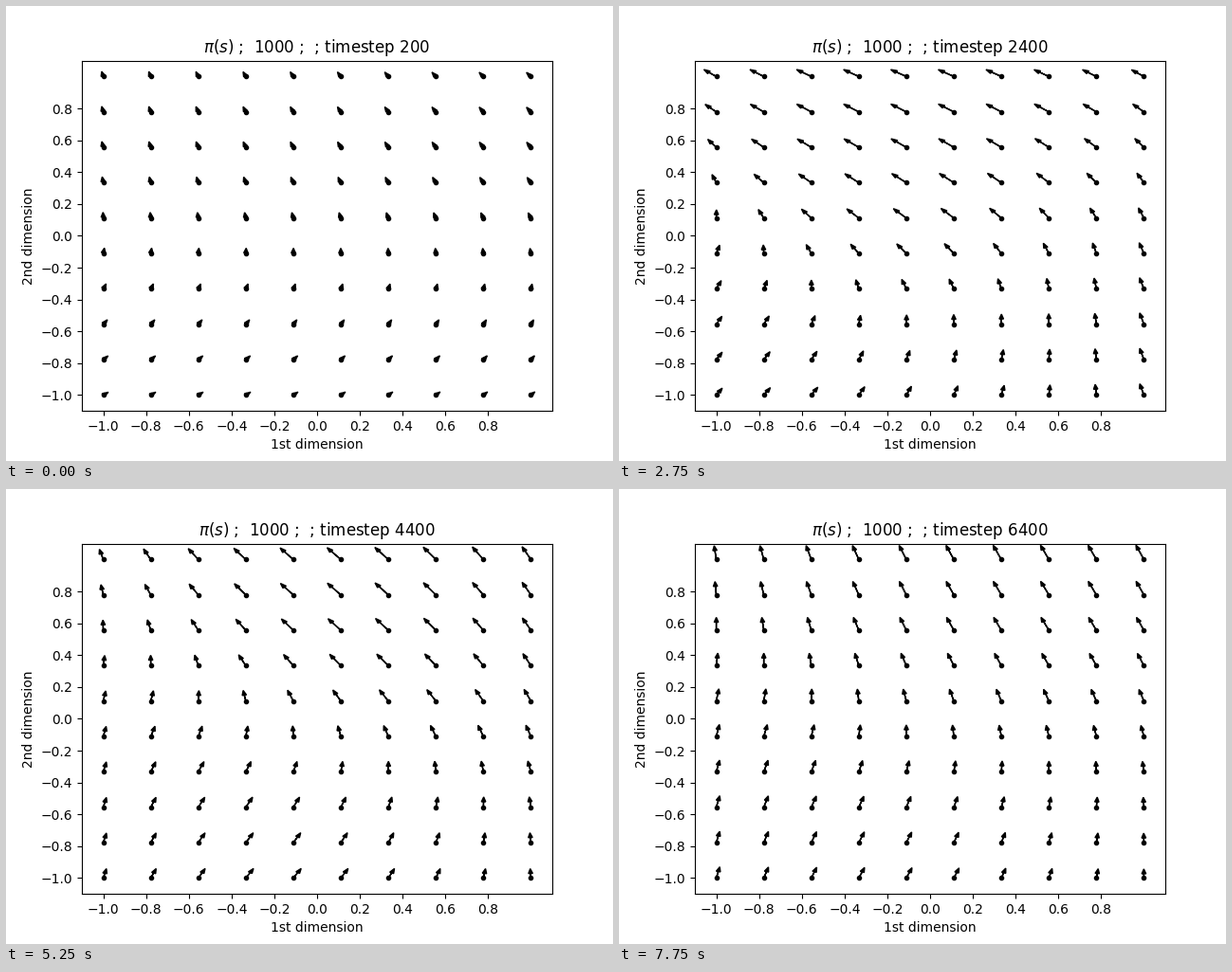
Recreate the animation shown at these times as a matplotlib script. Size 640x480 px, loop 8 s.

```python
import numpy as np
import matplotlib.pyplot as plt
from matplotlib.animation import FuncAnimation

FRAMES, INTERVAL = 32, 250
PX = np.array([225.45, 168.0])   # pixels per data unit
HEAD_W, HEAD_L = 0.02, 0.03
MITER = 1.0                      # pixels the stroke adds beyond the tip
SOFTNESS = 0.45                  # half width of the turn between the two flows

side = np.linspace(-1, 1, 10)
x, y = (g.ravel() for g in np.meshgrid(side, side[::-1]))


def track(*values):
    """Smooth course of a parameter through its values at four key times."""
    keys = np.array([0, 9, 19, 31])
    values = np.array(values, float)
    slope = np.gradient(values, keys, edge_order=2)
    now = np.arange(FRAMES)
    i = np.clip(np.searchsorted(keys, now, side="right") - 1, 0, 2)
    h = keys[i + 1] - keys[i]
    u = (now - keys[i]) / h
    curve = ((1 + 2 * u) * (1 - u) ** 2 * values[i]
             + u * (1 - u) ** 2 * h * slope[i]
             + u * u * (3 - 2 * u) * values[i + 1]
             + u * u * (u - 1) * h * slope[i + 1])
    return curve[:, None]


def across(left, middle, right):
    """Parabola over x through three values."""
    return (middle * (1 - x * x) + left * x * (x - 1) / 2
            + right * x * (x + 1) / 2)


def blend(a, b, s):
    return a + (b - a) * (s + 1) / 2


# Sideways reach in pixels: an upper and a lower flow meet at a curved border
upper = across(track(-2, -15, -7, -3),
               track(-4, -16.5, -16, -8.5),
               track(-5.5, -15, -10.5, -9))
lower = across(track(6.5, 7.5, 4, 4),
               track(6, 6, 9, 6.5),
               track(5.3, -4.5, -1, 0))
border = across(track(-0.2, 0.2, 0.6, 0.5),
                track(-0.2, -0.36, -0.1, -0.1),
                track(-0.2, 0.55, -0.1, 0))
reach_x = blend(lower, upper, np.tanh((y - border) / SOFTNESS))

# Upward reach: blended from the corners, with a swell at mid height
top = blend(track(6.3, 7.3, 11, 15.5), track(5, 6.5, 13.5, 16), x)
bottom = blend(track(3.5, 7.3, 10.3, 12.7), track(4, 12.3, 11, 10.5), x)
reach_y = blend(bottom, top, y) + track(2, 2, 0.6, -0.4) * (1 - y * y)

reach = np.stack([reach_x, reach_y], axis=-1)
length = np.linalg.norm(reach, axis=-1, keepdims=True)
vectors = reach * (1 - MITER / length) / PX

fig, ax = plt.subplots(figsize=(6.4, 4.8), dpi=100)
title = ax.set_title("")
ax.plot(x, y, "k.")
arrows = [ax.arrow(px, py, dx, dy, width=0.001, head_width=HEAD_W,
                   head_length=HEAD_L, length_includes_head=True,
                   fc="k", ec="k")
          for px, py, (dx, dy) in zip(x, y, vectors[0])]
ticks = np.arange(-5, 5) / 5
ax.set(xlim=(-1.1, 1.1), ylim=(-1.1, 1.1), xticks=ticks, yticks=ticks,
       xlabel="1st dimension", ylabel="2nd dimension")


def update(i):
    title.set_text(rf"$\pi(s)$ ;  1000 ;  ; timestep {200 * (i + 1)}")
    for arrow, (dx, dy) in zip(arrows, vectors[i]):
        arrow.set_data(dx=dx, dy=dy)
    return [title, *arrows]


anim = FuncAnimation(fig, update, frames=FRAMES, interval=INTERVAL,
                     repeat=True, repeat_delay=0)
plt.show()
```
